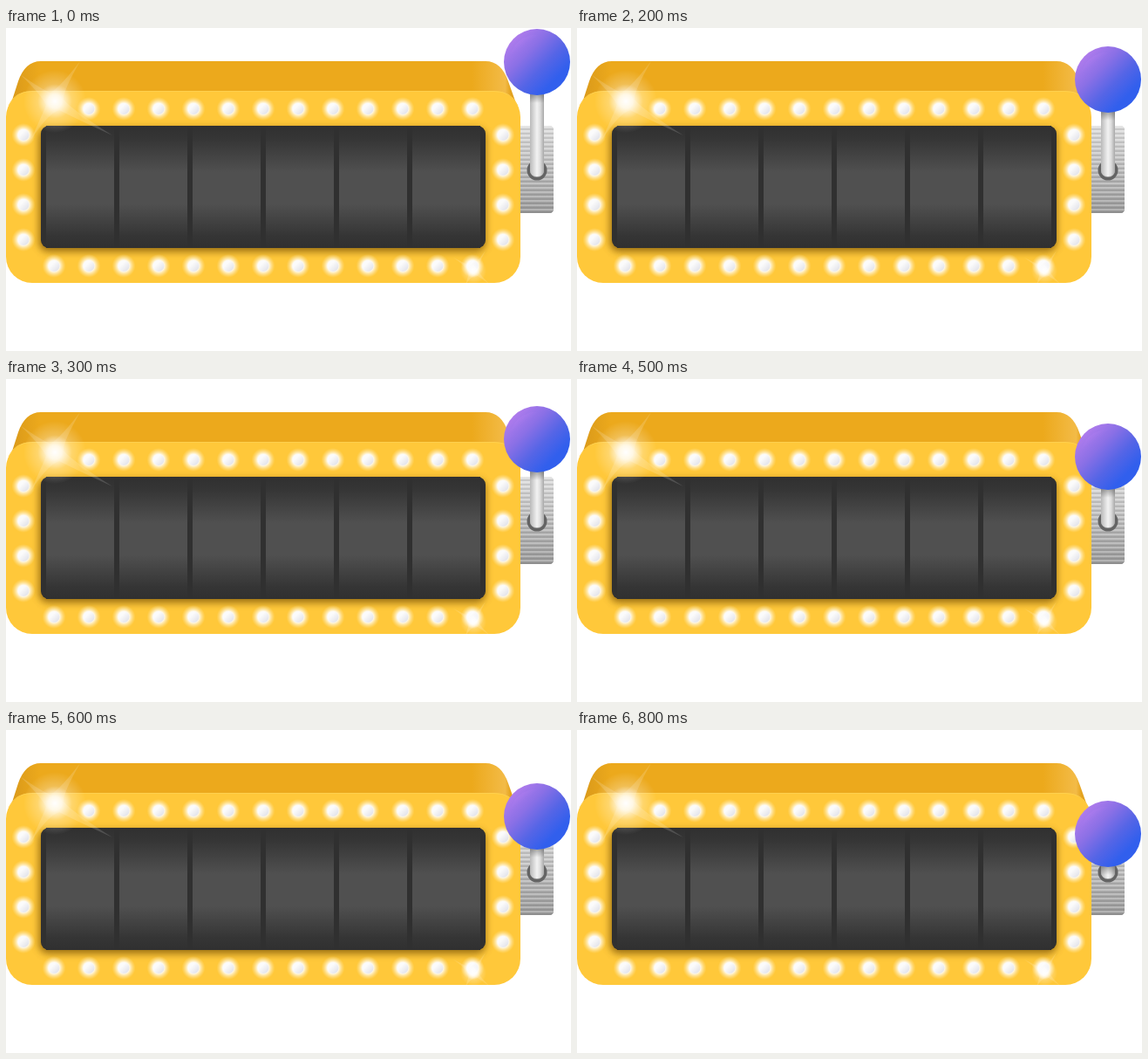
An HTML page that plays this animation: 648x370 px, repeating every 900 ms.

```html
<!DOCTYPE html>
<html lang="en">
<head>
<meta charset="utf-8">
<title>Slot machine</title>
<style>
  html, body { margin: 0; width: 100%; height: 100%; overflow: hidden; background: #fff; }
  svg { display: block; width: 648px; height: 370px; }
  .pull { animation: pull 900ms steps(9) infinite; }
  @keyframes pull { to { transform: translateY(90px); } }
</style>
</head>
<body>
<svg viewBox="0 0 648 370">
  <defs>
    <linearGradient id="back">
      <stop offset="0" stop-color="#d8981a"/>
      <stop offset=".06" stop-color="#eca91c"/>
      <stop offset=".91" stop-color="#eca91c"/>
      <stop offset=".975" stop-color="#f3bb47"/>
      <stop offset=".985" stop-color="#e5a41f"/>
      <stop offset="1" stop-color="#d8981a"/>
    </linearGradient>
    <linearGradient id="reel" x2="0" y2="1">
      <stop offset="0" stop-color="#303030"/>
      <stop offset=".1" stop-color="#353535"/>
      <stop offset=".38" stop-color="#505050"/>
      <stop offset=".64" stop-color="#505050"/>
      <stop offset=".9" stop-color="#353535"/>
      <stop offset="1" stop-color="#303030"/>
    </linearGradient>
    <linearGradient id="plate" x2="0" y2="1">
      <stop offset="0" stop-color="#dedede"/>
      <stop offset=".5" stop-color="#bcbcbc"/>
      <stop offset="1" stop-color="#999"/>
    </linearGradient>
    <pattern id="lines" y="112" width="38" height="5" patternUnits="userSpaceOnUse">
      <rect width="38" height="2" fill="#fff" opacity=".24"/>
      <rect y="3" width="38" height="2" fill="#555" opacity=".14"/>
    </pattern>
    <linearGradient id="rod">
      <stop offset="0" stop-color="#b9b9b9"/>
      <stop offset=".3" stop-color="#dcdcdc"/>
      <stop offset=".5" stop-color="#f2f2f2"/>
      <stop offset=".72" stop-color="#dedede"/>
      <stop offset="1" stop-color="#a8a8a8"/>
    </linearGradient>
    <linearGradient id="rodShade" x2="0" y2="1">
      <stop offset="0" stop-color="#555" stop-opacity=".6"/>
      <stop offset="1" stop-color="#555" stop-opacity="0"/>
    </linearGradient>
    <linearGradient id="ball" x1=".12" y1=".18" x2=".82" y2=".86">
      <stop offset="0" stop-color="#ae7bec"/>
      <stop offset=".3" stop-color="#8b70e6"/>
      <stop offset=".62" stop-color="#5565e6"/>
      <stop offset=".9" stop-color="#315fed"/>
    </linearGradient>
    <linearGradient id="shine" x2=".7" y2=".8">
      <stop offset="0" stop-color="#c78bfa" stop-opacity=".65"/>
      <stop offset=".6" stop-color="#b07df0" stop-opacity="0"/>
    </linearGradient>
    <radialGradient id="glow">
      <stop offset="0" stop-color="#fff"/>
      <stop offset=".5" stop-color="#fff" stop-opacity=".85"/>
      <stop offset="1" stop-color="#ffe9a8" stop-opacity="0"/>
    </radialGradient>
    <radialGradient id="flare">
      <stop offset="0" stop-color="#fff"/>
      <stop offset=".22" stop-color="#fff" stop-opacity=".85"/>
      <stop offset=".55" stop-color="#fff" stop-opacity=".25"/>
      <stop offset="1" stop-color="#fff" stop-opacity="0"/>
    </radialGradient>
    <radialGradient id="ray" gradientUnits="userSpaceOnUse" r="76">
      <stop offset="0" stop-color="#fff"/>
      <stop offset=".45" stop-color="#fff" stop-opacity=".85"/>
      <stop offset="1" stop-color="#fff" stop-opacity=".15"/>
    </radialGradient>
    <linearGradient id="bulbFill" x2="1" y2="1">
      <stop offset=".35" stop-color="#fbfbfb"/>
      <stop offset="1" stop-color="#dcdde6"/>
    </linearGradient>
    <g id="bulb">
      <circle r="13.5" fill="url(#glow)"/>
      <circle r="6.5" fill="url(#bulbFill)"/>
    </g>
    <filter id="shadow" x="-10%" y="-20%" width="120%" height="140%">
      <feGaussianBlur stdDeviation="4"/>
    </filter>
    <clipPath id="slot"><rect x="601" y="-20" width="16" height="190" rx="7"/></clipPath>
  </defs>

  <path d="M4 92 L14 61 Q22 38 40 38 H550 Q568 38 576 61 L587 92Z" fill="url(#back)"/>
  <rect y="72" width="590" height="220" rx="30" fill="#ffc83a"/>
  <path d="M3 89 Q10 72.5 30 72.5 H560 Q580 72.5 587 89" fill="none" stroke="#ffd04e"/>

  <rect x="38" y="115" width="512" height="141" rx="10" fill="#6b4500" opacity=".7" filter="url(#shadow)"/>
  <rect x="40" y="112" width="510" height="140" rx="9" fill="#303030"/>
  <g id="reels"></g>
  <g id="bulbs"></g>

  <g transform="translate(56 84)">
    <circle r="36" fill="url(#flare)"/>
    <path d="M29-46 Q9-11 10-2 Q20 10 66 39 Q16 16 5 10 Q-8 14-28 45 Q-13 12-10 4 Q-16-8-40-31 Q-14-13-5-10 Q6-16 29-46Z" fill="url(#ray)"/>
  </g>
  <g transform="translate(536 278)">
    <circle r="15" fill="url(#flare)"/>
    <path d="M14-23 Q5-6 5-1 Q8 5 18 15 Q8 8 3 5 Q-3 7-9 16 Q-6 7-5 2 Q-9-6-23-15 Q-7-7-2-5 Q3-8 14-23Z" fill="url(#ray)"/>
  </g>

  <path id="mount" d="M590 112 H623 Q628 112 628 117 V207 Q628 212 623 212 H590Z" fill="url(#plate)"/>
  <use href="#mount" style="fill:url(#lines)"/>
  <path d="M590 112 H623 Q628 112 628 117 V207 Q628 212 623 212 H590Z" fill="url(#lines)"/>
  <circle cx="609" cy="163" r="9.8" fill="#aaa" stroke="#646464" stroke-width="3.4"/>

  <g clip-path="url(#slot)">
    <g class="pull">
      <rect x="601" y="60" width="16" height="120" fill="url(#rod)"/>
      <rect x="601" y="74" width="16" height="12" fill="url(#rodShade)"/>
    </g>
  </g>
  <g class="pull">
    <circle cx="609" cy="39" r="38" fill="url(#ball)"/>
    <path d="M577 38 A32 32 0 0 1 612 8 L610 17 A25 25 0 0 0 585 38Z" fill="url(#shine)"/>
  </g>
</svg>
<script>
  const add = (parent, name, attrs) => {
    const node = document.createElementNS("http://www.w3.org/2000/svg", name);
    for (const key in attrs) node.setAttribute(key, attrs[key]);
    document.getElementById(parent).append(node);
  };
  const bulb = (x, y) => add("bulbs", "use", { href: "#bulb", x, y });

  for (let i = 0; i < 6; i++)
    add("reels", "rect", { x: 46 + 84 * i, y: 112, width: 78, height: 140, fill: "url(#reel)" });

  for (let x = 55; x <= 535; x += 40) {
    if (x > 55) bulb(x, 92.5);
    bulb(x, 272.5);
  }
  for (let y = 122.5; y < 250; y += 40) {
    bulb(20, y);
    bulb(570, y);
  }
</script>
</body>
</html>
```
